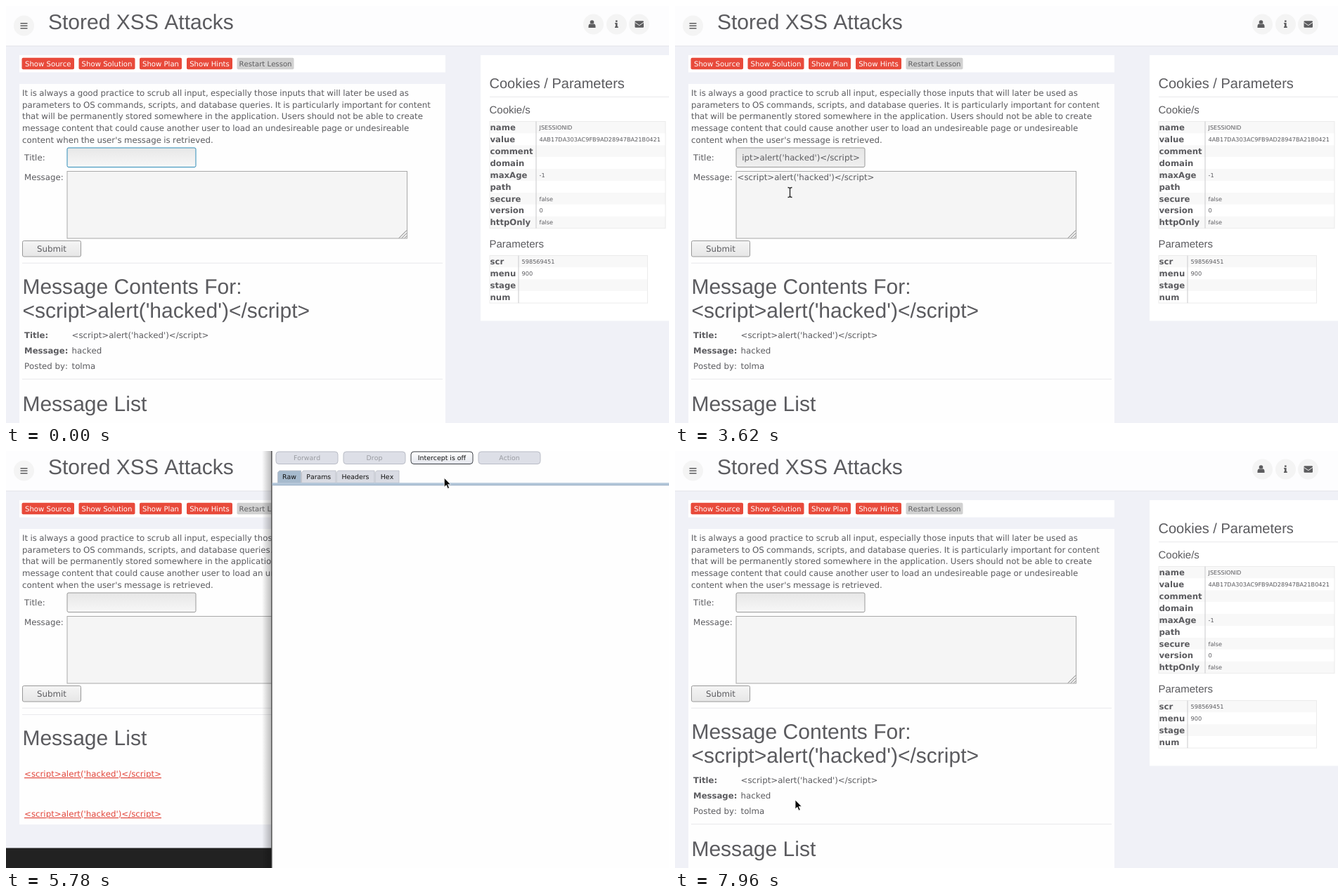
An HTML page that plays this animation: 943 by 594 pixels, repeating every 8000 ms.

```html
<!DOCTYPE html>
<html lang="en">
<head>
<meta charset="utf-8">
<title>Stored XSS Attacks</title>
<style>
html, body { margin: 0; width: 100%; height: 100%; overflow: hidden; background: #f0f1f7; }
svg { display: block; width: 943px; height: 594px; }
text {
  font: 11.8px "DejaVu Sans", sans-serif; fill: #5b5b5f; white-space: pre;
  text-rendering: geometricPrecision; font-kerning: none; font-variant-ligatures: none;
}
.para { word-spacing: -.4px; }
.bold { font-size: 11.7px; font-weight: bold; }
.h1, .h2, .h3 { font: 30.04px "Liberation Sans", Arial, sans-serif; font-kerning: none; }
.h2 { font-size: 20px; }
.h3 { font-size: 15px; }
.btn { font-size: 10.15px; fill: #fff; text-anchor: middle; }
.small { font-size: 8.2px; }
.menu { font-size: 10.7px; fill: #111; }
.tool { font-size: 9.4px; fill: #111; text-anchor: middle; }
.mid { text-anchor: middle; }
.link { fill: #e2463b; text-decoration: underline; }
.link.hover { fill: #18987f; }
</style>
</head>
<body>
<svg id="stage" viewBox="0 0 943 594" xmlns="http://www.w3.org/2000/svg"></svg>
<script>
const LOOP = 8000;
const TAG = "&lt;script&gt;alert('hacked')&lt;/script&gt;";

// drawing helpers
const text = (x, y, s, cls = "", extra = "") => `<text x="${x}" y="${y}" class="${cls}" ${extra}>${s}</text>`;
const rect = (x, y, w, h, fill, extra = "") => `<rect x="${x}" y="${y}" width="${w}" height="${h}" fill="${fill}" ${extra}/>`;
const path = (d, extra) => `<path d="${d}" ${extra}/>`;
const disc = (x, y, r, fill) => `<circle cx="${x}" cy="${y}" r="${r}" fill="${fill}"/>`;
const rule = (x, y, w) => rect(x, y, w, 1, "#e9e9ec");
const group = (id, ...parts) => `<g id="${id}">${parts.join("")}</g>`;
const fade = (id, a, b) =>
  `<linearGradient id="${id}" x2="0" y2="1"><stop stop-color="${a}"/><stop offset="1" stop-color="${b}"/></linearGradient>`;

function header() {
  const c = "#5d5d5f";
  return rect(0, 0, 943, 57, "#fdfdfe") + rect(0, 56.5, 943, 1, "#e3e4e9") +
    disc(25.5, 28, 14.5, "#f4f4f4") +
    [24, 27.5, 31].map(y => rect(20.5, y, 10, 1.5, c)).join("") +
    text(60, 33.2, "Stored XSS Attacks", "h1") +
    [835.5, 868.5, 900.5].map(x => disc(x, 26, 14.5, "#f4f4f4")).join("") +
    disc(833.5, 23, 2.8, c) +
    path("M828.5 31V29Q828.5 25.6 831 25.2Q833.5 27 836 25.2Q838.5 25.6 838.5 29V31Z", `fill="${c}"`) +
    rect(867, 20.5, 2.6, 2.3, c) +
    path("M866 24H869.6V29.3H870.7V31H866V29.3H867V25.6H866Z", `fill="${c}"`) +
    rect(894.5, 21.3, 12.5, 9.4, c, 'rx="1.2"') +
    path("M894.5 23.4L900.8 27.6L907 23.4", 'fill="none" stroke="#f4f4f4" stroke-width="1"');
}

function toolbar() {
  const items = [["Show Source", 22.5, 74.5], ["Show Solution", 103.5, 80], ["Show Plan", 190, 60],
    ["Show Hints", 257, 65], ["Restart Lesson", 328.5, 81]];
  return rect(19, 70, 606, 24.5, "#fff") + items.map(([s, x, w], i) =>
    rect(x, 73.8, w, 16.4, i < 4 ? "#e84a3b" : "#d1d1d1", 'rx="2"') +
    text(x + w / 2, 86, s, "btn", i < 4 ? "" : 'style="fill:#5e5e60"')).join("");
}

function form() {
  const lines = [
    "It is always a good practice to scrub all input, especially those inputs that will later be used as",
    "parameters to OS commands, scripts, and database queries. It is particularly important for content",
    "that will be permanently stored somewhere in the application. Users should not be able to create",
    "message content that could cause another user to load an undesireable page or undesireable",
    "content when the user's message is retrieved."];
  return lines.map((s, i) => text(23, 128 + i * 16.68, s, "para")).join("") +
    text(26, 220, "Title:") + text(26, 247.5, "Message:") +
    rect(87, 202, 183, 27.5, "url(#empty)", 'id="field" rx="2" stroke="#999"') +
    rect(87, 235.5, 483.5, 95.5, "#f5f5f5", 'stroke="#a9a9a9"') +
    path("M559 330.5L570 319.5M563 330.5L570 323.5M567 330.5L570 327.5", 'stroke="#777" stroke-width="1"') +
    rect(23.5, 334.5, 83, 22.5, "url(#push)", 'rx="2" stroke="#999"') +
    text(65, 350, "Submit", "mid") + rule(23, 365.7, 598);
}

function table(x, y, w, split, rows) {
  const h = 16.9;
  return rows.map(([k, v], i) =>
    rect(x, y + i * h, w, h, i % 2 ? "#fff" : "#f8f8f8") +
    text(x + .5, y + i * h + 12.6, k, "bold") +
    text(split + 4.5, y + i * h + 11.6, v, "small")).join("") +
    rect(x, y, w, h * rows.length, "none", 'stroke="#ebebeb"') +
    rect(split - .5, y, 1, h * rows.length, "#c9c9cc");
}

function sidebar() {
  return rect(675, 70, 268, 378.5, "#fff") +
    text(687.5, 117, "Cookies / Parameters", "h2") + rule(688, 129, 255) +
    text(687.5, 153, "Cookie/s", "h3") +
    table(688, 164.5, 250, 754, [["name", "JSESSIONID"], ["value", "4AB17DA303AC9FB9AD28947BA21B0421"],
      ["comment", ""], ["domain", ""], ["maxAge", "-1"], ["path", ""], ["secure", "false"],
      ["version", "0"], ["httpOnly", "false"]]) +
    text(687.5, 343.5, "Parameters", "h3") +
    table(688, 355.5, 224.5, 729, [["scr", "598569451"], ["menu", "900"], ["stage", ""], ["num", ""]]);
}

function proxy() {
  const buttons = ["Forward", "Drop", "Intercept is off", "Action"];
  const tabs = [["Raw", 386.5, 33], ["Params", 420.5, 48.5], ["Headers", 470, 54], ["Hex", 525, 34]];
  return rect(364, 0, 14, 594, "url(#shade)") + rect(378, 0, 565, 594, "#fefefe") +
    rect(377.2, 0, 1.4, 594, "#4a4a4a") +
    buttons.map((s, i) => {
      const on = i === 2, x = 384 + i * 96;
      return rect(x, 1, 88, 17.5, on ? "url(#live)" : "#dddfe7", `rx="4" stroke="${on ? "#3c4046" : "#b9bcc6"}"`) +
        text(x + 44, 13.4, s, "tool", on ? "" : 'style="fill:#999ba1"');
    }).join("") +
    tabs.map(([s, x, w], i) =>
      path(`M${x} 45.5V30.5L${x + 2.5} 28H${x + w}V45.5Z`, `fill="${i ? "#d9dbe3" : "#a6bacd"}" stroke="#b8bcc6" stroke-width=".8"`) +
      text(x + w / 2, 40.4, s, "tool")).join("") +
    rect(378.6, 45.3, 565, 3.6, "#b3c7da") + rect(378.6, 48.4, 565, .8, "#8fa6bd");
}

const stage = document.getElementById("stage");
stage.innerHTML = `<defs>${fade("empty", "#e7e7e7", "#f7f7f7")}${fade("filled", "#e6e6e6", "#efefef")}
  ${fade("push", "#f5f5f5", "#e6e6e6")}${fade("live", "#ffffff", "#e3e5ec")}
  <linearGradient id="shade"><stop stop-color="#000" stop-opacity="0"/><stop offset="1" stop-color="#000" stop-opacity=".28"/></linearGradient>
  <filter id="drop" x="-5%" y="-30%" width="110%" height="190%"><feDropShadow dx="0" dy="2" stdDeviation="2" flood-opacity=".35"/></filter></defs>` +
  rect(0, 0, 943, 594, "#f0f1f7") + header() + toolbar() +
  rect(19, 111, 606, 483, "#fefefe", 'id="panel"') + form() + sidebar() +
  group("contents",
    text(23.4, 410.3, "Message Contents For:", "h1"), text(23.4, 443.7, TAG, "h1"),
    text(26, 473, "Title:", "bold"), text(93.5, 473, TAG),
    text(26, 494.7, "Message:", "bold"), text(93.5, 494.7, "hacked"),
    text(26, 516.5, "Posted by:"), text(93.5, 516.5, "tolma"),
    rule(23, 531, 598), text(23.4, 576.5, "Message List", "h1")) +
  group("list",
    rule(23, 375, 598), text(23.4, 419.3, "Message List", "h1"),
    text(26, 464, TAG, "link", 'id="first"'), text(26, 521, TAG, "link"),
    rect(0, 565.5, 943, 28.5, "#222")) +
  group("titleText", text(95.3, 220, "ipt&gt;alert('hacked')&lt;/script&gt;")) +
  group("msgText", text(88.5, 248, TAG)) +
  group("caret", rect(94, 209, 1, 14, "#333")) +
  group("menu", rect(87, 230, 183, 19, "#fff", 'stroke="#c4c4c4" stroke-width=".8" filter="url(#drop)"'), text(92.5, 244.4, "hacked", "menu")) +
  group("proxy", proxy()) +
  group("mouse",
    path("M0 0V13L3 10.3L5 15.2L7.3 14.2L5.2 9.4H9.2Z", 'id="arrow" fill="#0a0a0a" stroke="#fff" stroke-width=".8"'),
    path("M-3 -7Q0 -7 0 -5Q0 -7 3 -7M0 -5V5M-3 7Q0 7 0 5Q0 7 3 7", 'id="beam" fill="none" stroke="#222" stroke-width="1.3"'),
    `<circle id="click" r="12.5" fill="#fbf63a" opacity=".76"/>`);

const el = id => document.getElementById(id);

// spans during which each part is visible, in ms
const shown = {
  contents: [[0, 4770], [7560, LOOP]],
  list: [[4770, 7560]],
  titleText: [[1770, 4770]],
  msgText: [[3240, 4770]],
  caret: [[290, 1370]],
  menu: [[1060, 1690]],
  proxy: [[4460, 6700]],
  mouse: [[520, LOOP]],
  beam: [[2230, 3700]],
  click: [[980, 1140], [2460, 2540], [4160, 4390], [6550, 6630], [7320, 7490]]
};
const within = (spans, t) => spans.some(([a, b]) => t >= a && t < b);

// pointer moves: first step, last step, step count, points passed
const moves = [
  [520, 980, 7, [[359, 240], [183, 219]]],
  [2150, 2460, 5, [[183, 219], [163.5, 265.5]]],
  [3700, 4080, 6, [[163.5, 265.5], [39, 339]]],
  [4460, 4620, 3, [[39, 339], [641, 18]]],
  [5780, 6470, 10, [[641, 18], [430, 260], [215, 486], [193, 450]]],
  [7010, 7170, 3, [[193, 450], [189.5, 461]]],
  [7710, 7960, 4, [[189.5, 461], [171, 497]]]
];

const ease = p => p * p * (3 - 2 * p);

function along(points, p) {
  const last = points.length - 1;
  const i = Math.min(last - 1, Math.floor(p * last));
  const f = p * last - i;
  return points[i].map((v, k) => v + (points[i + 1][k] - v) * f);
}

function pointer(t) {
  let at = moves[0][3][0];
  for (const [start, end, steps, points] of moves) {
    if (t < start) break;
    const done = Math.floor((t - start) / (end - start) * (steps - 1) + 1e-6) + 1;
    at = along(points, ease(Math.min(1, done / steps)));
  }
  return at;
}

function draw(t) {
  for (const id in shown) el(id).style.display = within(shown[id], t) ? "" : "none";
  el("arrow").style.display = within(shown.beam, t) ? "none" : "";
  el("panel").setAttribute("height", within(shown.list, t) ? 421 : 483);
  el("field").setAttribute("stroke", t < 2460 ? "#2f8db8" : "#999");
  el("field").setAttribute("fill", t >= 980 && t < 4770 ? "url(#filled)" : "url(#empty)");
  el("first").classList.toggle("hover", t >= 7090 && t < 7560);
  el("mouse").setAttribute("transform", `translate(${pointer(t).join(" ")})`);
}

const began = performance.now();
function tick() {
  draw((performance.now() - began) % LOOP);
  requestAnimationFrame(tick);
}
tick();
</script>
</body>
</html>
```
